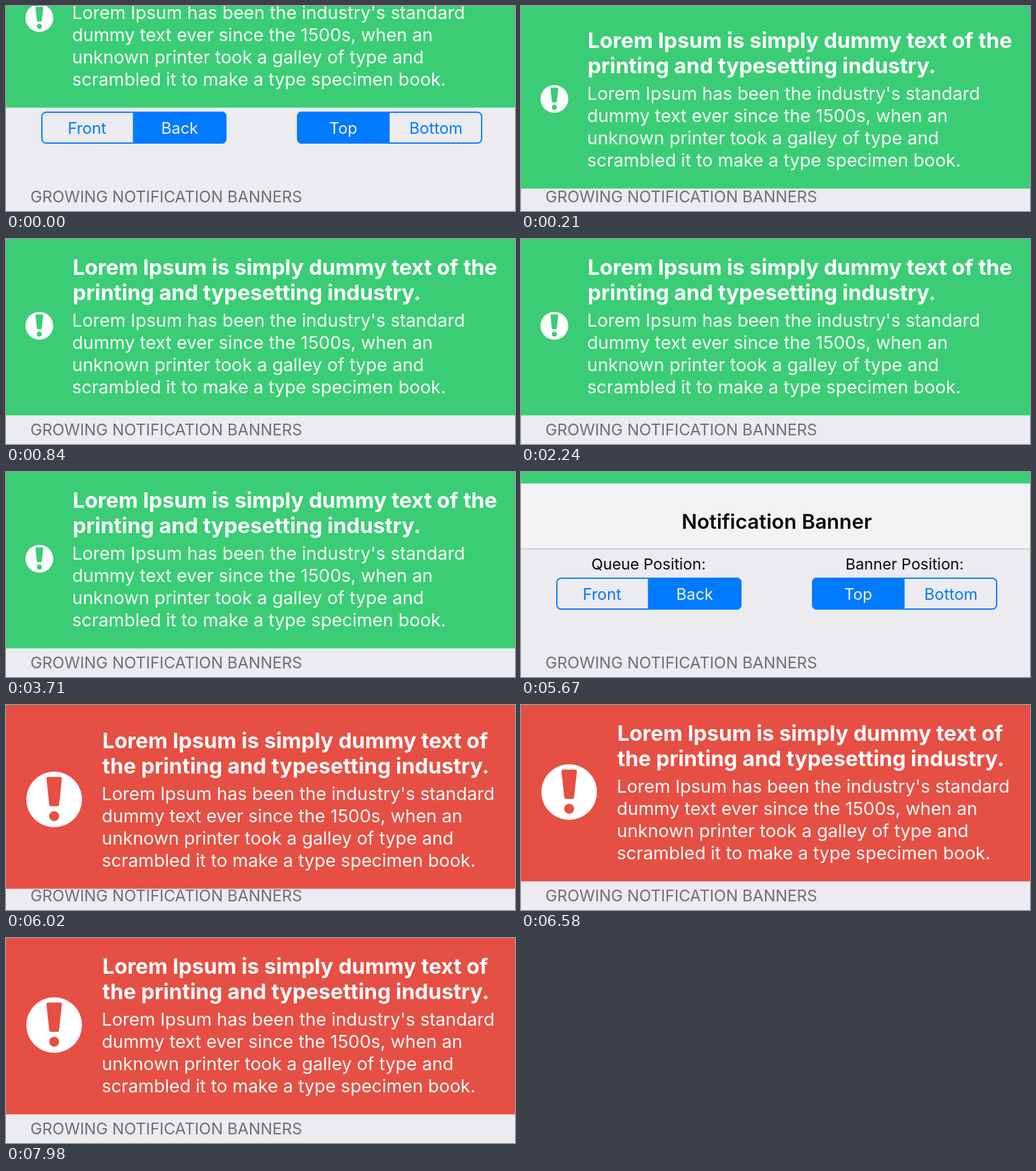
An HTML page with a canvas that plays this animation: 824 px wide and 332 px high, repeating every 8 s.

```html
<!DOCTYPE html>
<html lang="en">
<head>
<meta charset="utf-8">
<title>Growing notification banners</title>
<style>
  html, body { margin: 0; width: 100%; height: 100%; overflow: hidden; background: #ebebf0; }
  canvas { display: block; width: 824px; height: 332px; }
</style>
</head>
<body>
<canvas id="stage"></canvas>
<script>
const W = 824, H = 332, LOOP = 8000, STEP = 70;
const BANNER_H = 285.6;
const BLUE = '#007aff', PAGE = '#ebebf0';
const FAMILY = 'Inter, Roboto, sans-serif';

const canvas = document.getElementById('stage');
const ctx = canvas.getContext('2d');
const ratio = window.devicePixelRatio || 1;
canvas.width = W * ratio;
canvas.height = H * ratio;
ctx.scale(ratio, ratio);

const body = [
  "Lorem Ipsum has been the industry's standard",
  'dummy text ever since the 1500s, when an',
  'unknown printer took a galley of type and',
  'scrambled it to make a type specimen book.'
];
const success = {
  color: '#3acd75', textX: 107, iconX: 54, iconY: 140.5, iconScale: 0.5,
  title: ['Lorem Ipsum is simply dummy text of the', 'printing and typesetting industry.']
};
const danger = {
  color: '#e64f44', textX: 155, iconX: 78, iconY: 141, iconScale: 1,
  title: ['Lorem Ipsum is simply dummy text of', 'the printing and typesetting industry.']
};

// Underdamped spring from 0 to 1, time in ms.
function spring(ms) {
  if (ms <= 0) return 0;
  const damping = 0.862, a = 14.06 * ms / 1000;
  return 1 - Math.exp(-damping * a) * (Math.cos(a) + damping * Math.sin(a));
}

// cubic-bezier(.42, 0, .58, 1)
function easeInOut(x) {
  if (x <= 0) return 0;
  if (x >= 1) return 1;
  let lo = 0, hi = 1;
  for (let i = 0; i < 24; i++) {
    const s = (lo + hi) / 2, r = 1 - s;
    if (1.26 * s * r * r + 1.74 * s * s * r + s * s * s < x) lo = s; else hi = s;
  }
  return lo * lo * (3 - 2 * lo);
}

function text(str, x, y, size, color, weight = 400, align = 'left') {
  ctx.font = `${weight} ${size}px ${FAMILY}`;
  ctx.textAlign = align;
  ctx.fillStyle = color;
  ctx.fillText(str, x, y);
}

function box(x, y, w, h, color) {
  ctx.fillStyle = color;
  ctx.fillRect(x, y, w, h);
}

function disc(x, y, r, color) {
  ctx.fillStyle = color;
  ctx.beginPath();
  ctx.arc(x, y, r, 0, Math.PI * 2);
  ctx.fill();
}

function segments(x, split, labels, active) {
  const y = 171, w = 300, h = 52;
  ctx.save();
  ctx.beginPath();
  ctx.roundRect(x, y, w, h, 8);
  ctx.clip();
  if (active === 0) box(x, y, split - x, h, BLUE);
  else box(split, y, x + w - split, h, BLUE);
  ctx.restore();
  ctx.strokeStyle = BLUE;
  ctx.lineWidth = 2;
  ctx.beginPath();
  ctx.roundRect(x + 1, y + 1, w - 2, h - 2, 7);
  ctx.stroke();
  const centers = [(x + split) / 2, (split + x + w) / 2];
  labels.forEach((label, i) =>
    text(label, centers[i], 207, 25.6, i === active ? '#f1f3f8' : BLUE, 400, 'center'));
}

function page() {
  box(0, 0, W, H, PAGE);
  box(0, 0, W, 124, '#f3f3f5');
  box(0, 124, W, 1, '#b8b8bb');
  text('Notification Banner', 414, 92, 33, '#0b0b0b', 600, 'center');
  text('Queue Position:', 206.5, 158, 24.9, '#0b0b0b', 400, 'center');
  text('Banner Position:', 621, 158, 24.9, '#0b0b0b', 400, 'center');
  segments(57, 205.5, ['Front', 'Back'], 1);
  segments(471, 621, ['Top', 'Bottom'], 0);
  text('GROWING NOTIFICATION BANNERS', 39.5, 318, 25.55, '#6f6f74');
}

function icon({ iconX, iconY, iconScale, color }) {
  ctx.save();
  ctx.translate(iconX, iconY);
  ctx.scale(iconScale, iconScale);
  disc(0, 0, 45, '#fff');
  ctx.fillStyle = ctx.strokeStyle = color;
  ctx.lineWidth = 6;
  ctx.lineJoin = 'round';
  ctx.beginPath();
  ctx.moveTo(-9.5, -33.5);
  ctx.lineTo(9.5, -33.5);
  ctx.lineTo(5, 8);
  ctx.lineTo(-5, 8);
  ctx.closePath();
  ctx.fill();
  ctx.stroke();
  disc(0, 27, 8, color);
  ctx.restore();
}

// shown: 0 is fully above the stage, 1 is at rest, over 1 is overshoot.
function banner(look, shown) {
  if (shown <= 0) return;
  const shift = Math.round((shown - 1) * BANNER_H);
  box(0, 0, W, BANNER_H + shift, look.color);
  ctx.save();
  ctx.translate(0, shift);
  icon(look);
  look.title.forEach((line, i) => text(line, look.textX + 1, 58 + i * 41, 34.4, '#fff', 700));
  body.forEach((line, i) => text(line, look.textX, 142 + i * 36, 29, '#f8fbf8'));
  ctx.restore();
}

function draw(t) {
  page();
  if (t < 5740) banner(success, spring(t + 84) - easeInOut((t - 5297) / 455));
  else banner(danger, spring(t - 5737));
}

const start = performance.now();
function tick() {
  const t = (performance.now() - start) % LOOP;
  draw(Math.floor(t / STEP) * STEP);
  requestAnimationFrame(tick);
}
tick();
</script>
</body>
</html>
```
